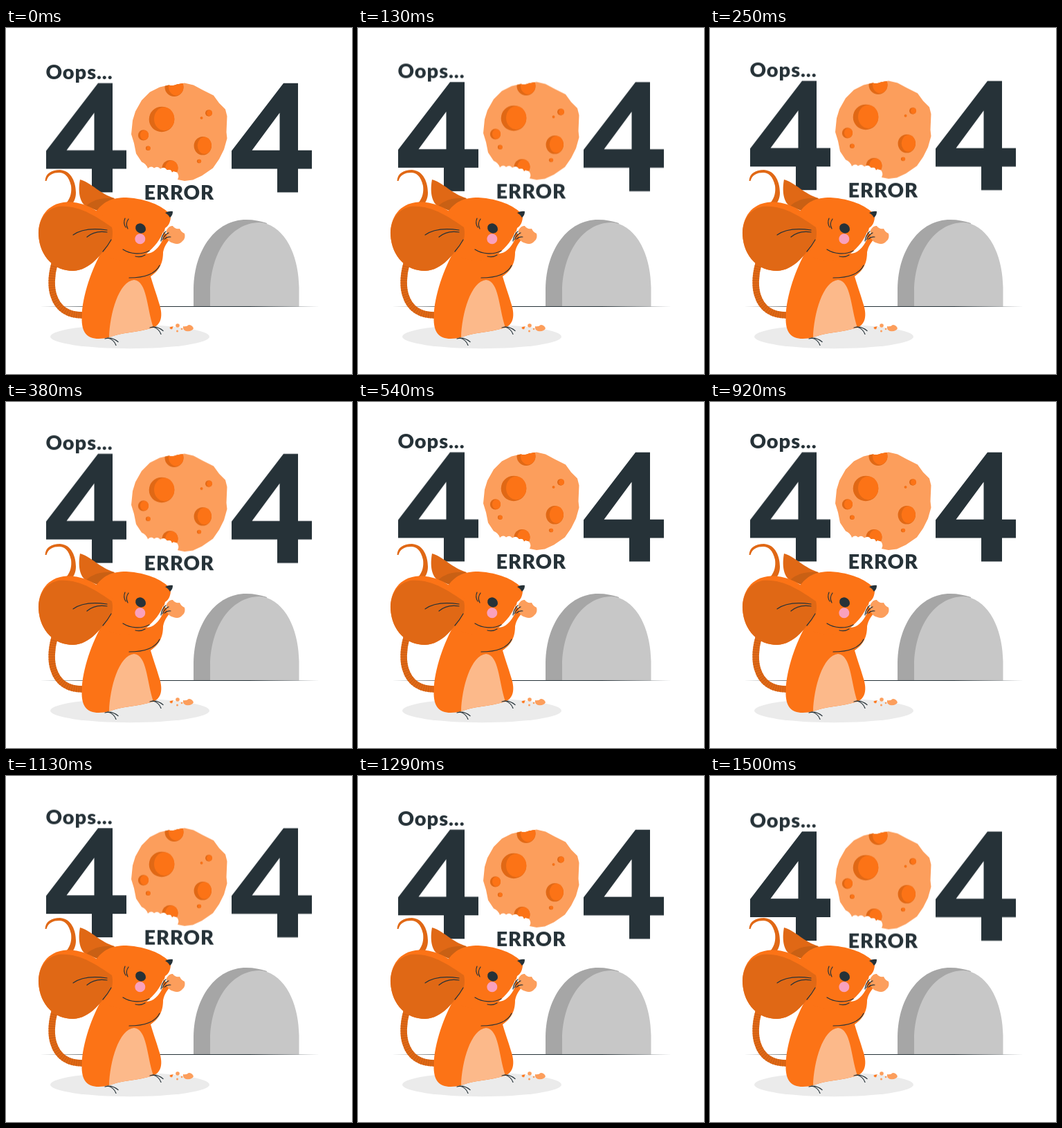
Animation, 500 px wide and 500 px high, one loop 1.54 s. Source, as an HTML page:

```html
<!DOCTYPE html>
<html lang="en">
<head>
<meta charset="utf-8">
<title>404</title>
<style>
  html, body { margin: 0; width: 100%; height: 100%; overflow: hidden; background: #fff; }
  svg { display: block; width: 100vw; height: 100vh; }
  text { font: 900 29px Lato, sans-serif; letter-spacing: .9px; }
  .ink { fill: #263238; }
  .main { fill: #fc7316; }
  .deep { fill: #e06815; }
  .pale { fill: #fc9e5c; }
  .line { fill: none; stroke: #263238; stroke-width: 1.2; stroke-linecap: round; }
</style>
</head>
<body>
<svg viewBox="0 0 500 500">
  <defs>
    <path id="four" fill-rule="evenodd" d="M133 80.300H154V177.300H174V204H154V238H124V204H58V178ZM127.500 123L87.500 177.300H127.500Z"/>
    <path id="cookie" d="M258 80L271 83 284 90 300 98 308 109 317 118 319.500 128 318.500 151 319.500 160 315 176 308 190 299 203 283 214 270 220 258 221.500 248 219.500Q251 214 247 209Q241 206 240 209Q239 204 233 205.500Q229 200 223 204Q219 199 214 203Q210 199 205 203.500Q203 197 196 194L188 182 185 167 181 154 183 134 187 121 196 105 208 93 222 86 235 83Q241 85 247 82Z"/>
    <clipPath id="disc"><use href="#cookie"/></clipPath>
    <path id="tail" d="M70 341C65 358 65 376 69 387C75 406 90 415.500 112 415"/>
  </defs>

  <g id="float">
    <g class="ink">
      <use href="#four"/>
      <use href="#four" x="268"/>
      <text x="57.500" y="75">Oops...</text>
      <text x="199.500" y="249">ERROR</text>
    </g>
    <use href="#cookie" class="pale"/>
    <g id="pits" clip-path="url(#disc)"></g>
  </g>

  <!-- mouse hole -->
  <path fill="#a6a6a6" d="M271 402.500V376C272 319 304 277 347 277C358 277 368 279 377 282L330 402.500Z"/>
  <path fill="#c7c7c7" d="M295 402.500V380C296 325 324 282 366 281Q372 281 377 283C409 295 423 336 423.500 375V402.500Z"/>
  <path class="ink" d="M49 402.500L150 402H350L453 402.500L350 403H150Z"/>
  <ellipse cx="179" cy="446" rx="115" ry="17.200" fill="#ebebeb"/>

  <!-- tail -->
  <path class="deep" d="M56.500 221C57 210 66 205 78 205C95 206 101 224 101 238C101 246 98 252 94 256L87 253C94 245 95 236 94 228C91 214 84 209 77 209C68 209 61 212 58.500 221Z"/>
  <g fill="none" stroke-width="9.500">
    <use href="#tail" stroke="#e06815"/>
    <use href="#tail" stroke="#c45b14" stroke-dasharray=".8 2.600"/>
  </g>

  <!-- far ear, body, head -->
  <path class="deep" d="M107 219C104 235 106 251 115 257L142 268L157 246C136 240 124 224 107 219Z"/>
  <path fill="#c96014" d="M116 257Q130 244 156 246L142 268Z"/>
  <path class="main" d="M139 322C125 346 110 386 109.500 418C109 440 117 449 134 449Q142 449 149 447C166 440 190 440 213 433C227 427 226 411 221 397C217 383 212 370 209 359C224 349 227 336 227 324C229 314 234 309 238 303L228 295L214 320L190 316Z"/>
  <path class="main" d="M128 268C140 251 152 245 174 245C205 247 224 257 234 266L238 272C238 280 235 286 230 289C225 309 213 325 196 326C190 340 150 340 139 323L152 304Z"/>
  <path fill="#fff" d="M227.500 293C224 305 214 317 203 326C213 326 221 317 226 307Z"/>
  <path fill="#fcb98a" d="M149 447C150 413 163 366 185 364C204 366 203 403 213 433C190 440 166 440 149 447Z"/>

  <!-- near ear -->
  <path class="main" d="M154 284C132 261 111 251 88 251.500C60 253 46 274 47 299C49 331 70 351 97 351C122 350 139 326 153 305Z"/>
  <path class="deep" d="M153 288C130 272 105 255 76 258C55 262 46 282 47 299C49 331 70 351 97 351C122 350 139 326 153 305Q155 296 153 288Z"/>
  <g class="line">
    <path d="M146 292C126 289 108 291 97 299"/>
    <path d="M146 295C134 293 124 296 117 302"/>
    <path d="M152 306Q147 315 140 323"/>
    <path d="M169 320C180 327 195 328 207 322"/>
    <path d="M187 330Q195 332 201 328"/>
    <path d="M178 361C196 361 215 357 222 343"/>
    <path d="M172 275Q169 282 173 288"/>
    <path d="M177 276Q172 283 176 290"/>
  </g>

  <!-- face -->
  <ellipse class="ink" cx="194.500" cy="289.500" rx="7.800" ry="6.800" transform="rotate(35 194.500 289.500)"/>
  <circle cx="193.800" cy="304.800" r="7.500" fill="#f9a1bd"/>
  <path class="ink" d="M230 267Q236 264 241 265Q241 271 237 274Q234 269 230 267Z"/>

  <!-- snack and paw -->
  <path class="pale" d="M232 292Q236 285 241 286Q244 291 251 290Q253 295 258 297Q260 304 255 308Q250 314 242 311Q234 309 232 302Z"/>
  <g class="line">
    <path d="M224 308Q225 299 231 294"/>
    <path d="M226 306Q229 299 235 296"/>
    <path d="M229 305Q233 301 238 302"/>
  </g>

  <!-- feet -->
  <g class="line" id="foot">
    <path d="M143 449Q153 446 162 453.500"/>
    <path d="M147 448Q156 450 159 458.500"/>
  </g>
  <use href="#foot" x="65" y="-16"/>

  <!-- crumbs -->
  <g class="pale">
    <path d="M256 431Q261 432 264 429Q269 429 271 434Q269 439 260 438Q255 436 256 431Z"/>
    <circle cx="248" cy="430" r="2.800"/>
    <circle cx="239" cy="433.500" r="2"/>
    <circle cx="247.500" cy="438" r="1.500"/>
    <circle cx="254" cy="435" r="1.300"/>
  </g>
  <path class="main" d="M236 433L242 431L239 435Z"/>
</svg>
<script>
  const pits = document.getElementById('pits');

  const addEllipse = (cx, cy, rx, ry, cls) => {
    const e = document.createElementNS('http://www.w3.org/2000/svg', 'ellipse');
    for (const [k, v] of Object.entries({ cx, cy, rx, ry, class: cls })) e.setAttribute(k, v);
    pits.append(e);
  };

  // each pit: shaded ellipse with a brighter one shifted right inside it
  [
    [243, 86, 13.5, 13.5], [225, 132.5, 18.3, 18.3], [198.5, 155.5, 7.6, 7.6],
    [205.3, 174.3, 3.4, 3.2], [284.3, 170.8, 12.7, 13.3], [293, 123.5, 5, 4.8],
    [282.5, 130.5, 1.9, 1.8], [279, 193, 3.1, 2.8], [237, 203, 11.5, 11.5]
  ].forEach(([x, y, rx, ry]) => {
    addEllipse(x, y, rx, ry, 'deep');
    addEllipse(x + rx * .2, y - ry * .03, rx * .8, ry * .92, 'main');
  });

  // up 10px and back, linear, held at 24 steps per second on a 10 ms clock
  const LOOP = 1540, STEPS = 37, RISE = 10;
  const frames = Array.from({ length: STEPS }, (_, i) => {
    const p = (i + 1) / STEPS;
    const y = -RISE * (1 - Math.abs(1 - 2 * p));
    return {
      offset: Math.round(i * 100 / 24) * 10 / LOOP,
      transform: `translateY(${y.toFixed(3)}px)`,
      easing: 'step-end'
    };
  });
  frames.push({ offset: 1, transform: frames[STEPS - 1].transform });
  document.getElementById('float').animate(frames, { duration: LOOP, iterations: Infinity });
</script>
</body>
</html>
```
